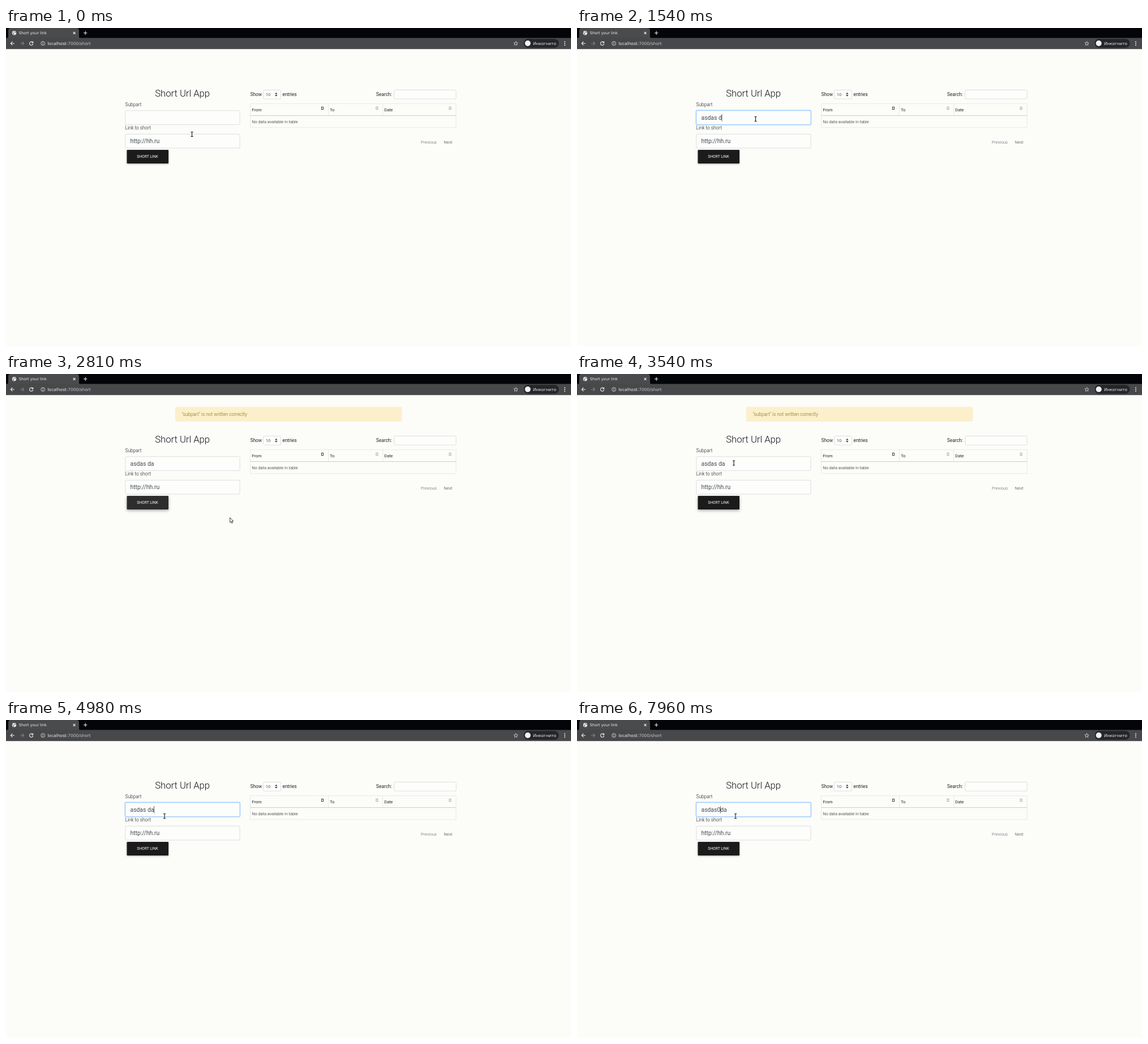
An HTML page that plays this animation: 998 by 561 pixels, repeating every 7990 ms.

```html
<!DOCTYPE html>
<html lang="en">
<head>
<meta charset="utf-8">
<title>Short your link</title>
<style>
  html, body { margin: 0; width: 100%; height: 100%; overflow: hidden; background: #fcfcf9; }
  svg { display: block; width: 100%; height: 100%; }
  text { font-family: Roboto, sans-serif; font-size: 8.32px; fill: #212529; white-space: pre; }
  .ui { font-family: "DejaVu Sans", sans-serif; font-size: 7.28px; fill: #eceef0; }
  .light { font-weight: 300; fill: #111417; }
  .cell { font-size: 7.45px; }
  .field { font-size: 10.4px; fill: #454c53; }
  .box { fill: #fdfdfb; stroke: #ced4da; stroke-width: .7; }
  .icon { fill: none; stroke: #eceef0; stroke-width: 1.1; }
  .edge { fill: none; stroke: #dee2e6; stroke-width: .7; }
</style>
</head>
<body>
<svg viewBox="0 0 998 561" preserveAspectRatio="none">
  <defs>
    <filter id="blur" x="-20%" y="-50%" width="140%" height="200%"><feGaussianBlur stdDeviation="1.6"/></filter>
  </defs>
  <rect width="998" height="561" fill="#fcfcf9"/>

  <g id="chrome">
    <rect width="998" height="18" fill="#030508"/>
    <path d="M2 18Q4 18 4 15V5Q4 0 8 0H125Q129 0 129 5V15Q129 18 131 18Z" fill="#4a4b4c"/>
    <rect y="17.5" width="998" height="19.7" fill="#47484a"/>
    <circle cx="14.5" cy="8.7" r="3.7" fill="#eceef0"/>
    <path d="M11.6 8.2l2.2 1.2-.3 2.4M14.2 5.8l1 1.5 2.3.4" fill="none" stroke="#4a4b4c"/>
    <text class="ui" x="22.8" y="11" style="font-size:6.7px">Short your link</text>
    <path class="icon" d="M118.7 7l3.8 3.8M122.5 7l-3.8 3.8M137 8.8h6.4M140.2 5.6v6.4"/>
    <path class="icon" d="M15 27.2H8.4M11.5 24l-3.2 3.2 3.2 3.2"/>
    <path class="icon" d="M25 27.2h6.6M28.5 24l3.2 3.2-3.2 3.2" style="stroke:#808286"/>
    <path class="icon" d="M47 25.2A3.1 3.1 0 1 0 47.7 28M47.7 23.6v2.6h-2.6"/>
    <circle class="icon" cx="65.2" cy="27.2" r="3.4" style="stroke-width:.8"/>
    <path class="icon" d="M65.2 26.7v2.3M65.2 25v.9" style="stroke-width:.9"/>
    <text class="ui" x="73.3" y="29.8" style="font-size:7.45px">localhost:<tspan fill="#c2c5c9">7000/short</tspan></text>
    <path class="icon" d="M900.5 23.6l1 2.4 2.6.2-2 1.7.6 2.6-2.2-1.4-2.2 1.4.6-2.6-2-1.7 2.6-.2z" style="stroke-width:.7"/>
    <rect x="914.5" y="19.3" width="62" height="15.4" rx="7.7" fill="#25262a"/>
    <circle cx="921.6" cy="27" r="5" fill="#f1f3f4"/>
    <text class="ui" x="931" y="29.8">Инкогнито</text>
    <g fill="#eceef0"><circle cx="987" cy="24.2" r=".95"/><circle cx="987" cy="27.2" r=".95"/><circle cx="987" cy="30.2" r=".95"/></g>
  </g>

  <g id="alert">
    <rect x="299.2" y="58.2" width="399.6" height="25.4" rx="2" fill="#fbf0cb" stroke="#faeaba" stroke-width=".5"/>
    <text class="light" x="310.5" y="74" style="fill:#856404">"subpart" is not written correctly</text>
  </g>

  <g id="form">
    <text class="light" x="263.2" y="121" style="font-size:16.64px">Short Url App</text>
    <text class="light" x="210.5" y="138">Subpart</text>
    <text class="light" x="210.5" y="179.2">Link to short</text>
    <rect id="glow" x="209.3" y="144.3" width="205" height="27.4" rx="3" fill="#bfdeff"/>
    <rect id="subBox" class="box" x="210.8" y="145.8" width="202.2" height="24.6" rx="2"/>
    <text id="sub" class="field" x="219.5" y="161.6"></text>
    <rect id="caret" y="152" width=".8" height="12.4" fill="#333"/>
    <rect class="box" x="210.8" y="187.3" width="202.2" height="24.6" rx="2"/>
    <text class="field" x="219.5" y="203.1">http://hh.ru</text>
    <rect id="button" x="213.5" y="215" width="73.5" height="24" rx="1"/>
    <text x="231.3" y="229.3" style="font-size:6.75px;fill:#fff">SHORT LINK</text>
  </g>

  <g id="table">
    <text x="431.5" y="119.8">Show</text>
    <rect class="box" x="454.6" y="109.4" width="30.8" height="15.8" rx="2"/>
    <text x="458.8" y="119.8" style="font-size:7.28px;fill:#495057">10</text>
    <path d="M475 116.5l2.2-2.8 2.2 2.8zM475 118l2.2 2.8 2.2-2.8z" fill="#343a40"/>
    <text x="488.3" y="119.8">entries</text>
    <text x="653.8" y="120">Search:</text>
    <rect class="box" x="685.6" y="109.4" width="109.4" height="15.8" rx="2"/>
    <path class="edge" d="M431.5 133.5H795V175.6H431.5ZM569.5 133.5V154.5M665.5 133.5V154.5"/>
    <path class="edge" d="M431.5 154.5H795" style="stroke:#c9cdd2;stroke-width:1"/>
    <text class="cell" x="434.2" y="146.5">From</text>
    <text class="cell" x="572" y="146.5">To</text>
    <text class="cell" x="668" y="146.5">Date</text>
    <g fill="none" stroke-width=".8">
      <rect x="557.3" y="139.3" width="3" height="4.4" stroke="#111"/>
      <rect x="653.8" y="139.3" width="3" height="4.4" stroke="#999"/>
      <rect x="783" y="139.3" width="3" height="4.4" stroke="#999"/>
    </g>
    <text class="cell light" x="434.2" y="167.8">No data available in table</text>
    <text class="cell light" x="732.7" y="203.6" style="fill:#565d64">Previous</text>
    <text class="cell light" x="773.3" y="203.6" style="fill:#343a40">Next</text>
  </g>

  <g id="list">
    <rect id="listShade" x="210.3" y="172" width="203.2" fill="#0004" filter="url(#blur)"/>
    <rect id="listBox" x="210.1" y="171.2" width="203.4" fill="#fdfdfb" stroke="#c4c6c9" stroke-width=".6"/>
    <g id="items"></g>
  </g>

  <g id="pointer">
    <g id="beam" fill="none">
      <path d="M-2-4H2M-2 4H2M0-4V4" stroke="#fff" stroke-width="2.2"/>
      <path d="M-2-4H-.5L0-3.5.5-4H2M-2 4H-.5L0 3.5.5 4H2M0-3.5V3.5" stroke="#111" stroke-width="1.1"/>
    </g>
    <path id="hand" d="M-.8 0Q0-.9.8 0V3.2L4 3.9Q5 4.2 4.8 5.6L4 9H-.6L-3.2 5.9Q-3.3 4.6-2 5L-.8 6Z" fill="#fff" stroke="#111" stroke-width=".8"/>
    <path id="arrow" d="M0 0V8.6L1.9 6.9 3.2 9.8 4.6 9.2 3.4 6.4H6Z" fill="#fff" stroke="#111" stroke-width=".8"/>
  </g>
</svg>
<script>
const LOOP = 7990;
const $ = id => document.getElementById(id);
const set = (id, attrs) => { for (const k in attrs) $(id).setAttribute(k, attrs[k]); };
const show = (id, on) => { $(id).style.display = on ? '' : 'none'; };

const T = { open: 720, submit: 2220, alertOn: 2350, refocus: 4550, alertOff: 4700 };
const history = ['sub', 'supbart', 'asdasd a', 'adad'];
// time, x, y
const path = [
  [0, 328.5, 187.5], [250, 328.5, 187.5], [620, 315.5, 160.5], [1620, 315.5, 160.5],
  [2020, 282.5, 219.5], [2420, 282.5, 219.5], [2760, 395.6, 253.3], [2860, 395.6, 253.3],
  [3200, 300, 160], [3500, 277, 157], [4580, 277, 157], [4780, 280, 169.5]
];
// time, value, caret index
const edits = [[0, '', 0]];
const typed = 'asdas da';
for (let i = 1; i <= typed.length; i++) edits.push([960 + i * 82, typed.slice(0, i), i]);
edits.push([T.refocus, typed, 8], [5750, typed, 7], [5980, typed, 6], [6520, 'asdasda', 5], [6900, 'asdas0da', 6]);

const ease = u => u * u * (3 - 2 * u);

function pointerAt(t) {
  const i = path.findIndex(p => p[0] > t);
  if (i < 0) return path[path.length - 1].slice(1);
  const [a, b] = [path[i - 1], path[i]];
  const u = ease((t - a[0]) / (b[0] - a[0]));
  return [a[1] + (b[1] - a[1]) * u, a[2] + (b[2] - a[2]) * u];
}

function drawList(names) {
  show('list', names.length);
  const h = names.length * 18.7 + 8;
  set('listBox', { height: h });
  set('listShade', { height: h });
  $('items').innerHTML = names.map((s, i) =>
    `<text class="ui" x="217" y="${186.7 + i * 18.7}" style="fill:#222">${s}</text>`).join('');
}

function drawPointer(x, y, onButton) {
  const onField = x > 210 && x < 414 && y > 130 && y < 212;
  set('pointer', { transform: `translate(${x} ${y})` });
  show('hand', onButton);
  show('beam', onField);
  show('arrow', !onButton && !onField);
}

function drawButton(t, pressed, raised) {
  const glare = pressed ? Math.min(1, (t - T.submit) / 150, Math.max(0, (3300 - t) / 400)) : 0;
  const tone = Math.round(27 + 18 * glare);
  set('button', { fill: `rgb(${tone},${tone},${tone})` });
  $('button').style.filter = `drop-shadow(${raised ? '0 2.4px 2.7px #0005' : '0 1px 1.4px #0005'})`;
}

function draw(t) {
  const [x, y] = pointerAt(t);
  const onButton = x > 213 && x < 287 && y > 215 && y < 239;
  const focused = (t >= T.open && t < T.submit) || t >= T.refocus;
  const pressed = t >= T.submit && t < T.refocus;
  const [at, value, index] = edits.filter(e => e[0] <= t).pop();

  if ($('sub').textContent !== value) $('sub').textContent = value;
  const blinkFrom = Math.max(at, T.open);
  show('caret', focused && Math.floor((t - blinkFrom) / 500) % 2 === 0);
  set('caret', { x: 219.2 + (index ? $('sub').getSubStringLength(0, index) : 0) });
  show('glow', focused);
  $('subBox').style.stroke = focused ? '#80bdff' : '';

  const listOpen = t >= T.open && t < T.submit;
  drawList(listOpen ? history.filter(s => s.startsWith(value)) : []);
  show('alert', t >= T.alertOn && t < T.alertOff);
  drawButton(t, pressed, onButton || pressed);
  drawPointer(x, y, onButton);
}

const start = performance.now();
function tick() {
  draw((performance.now() - start) % LOOP);
  requestAnimationFrame(tick);
}
tick();
</script>
</body>
</html>
```
